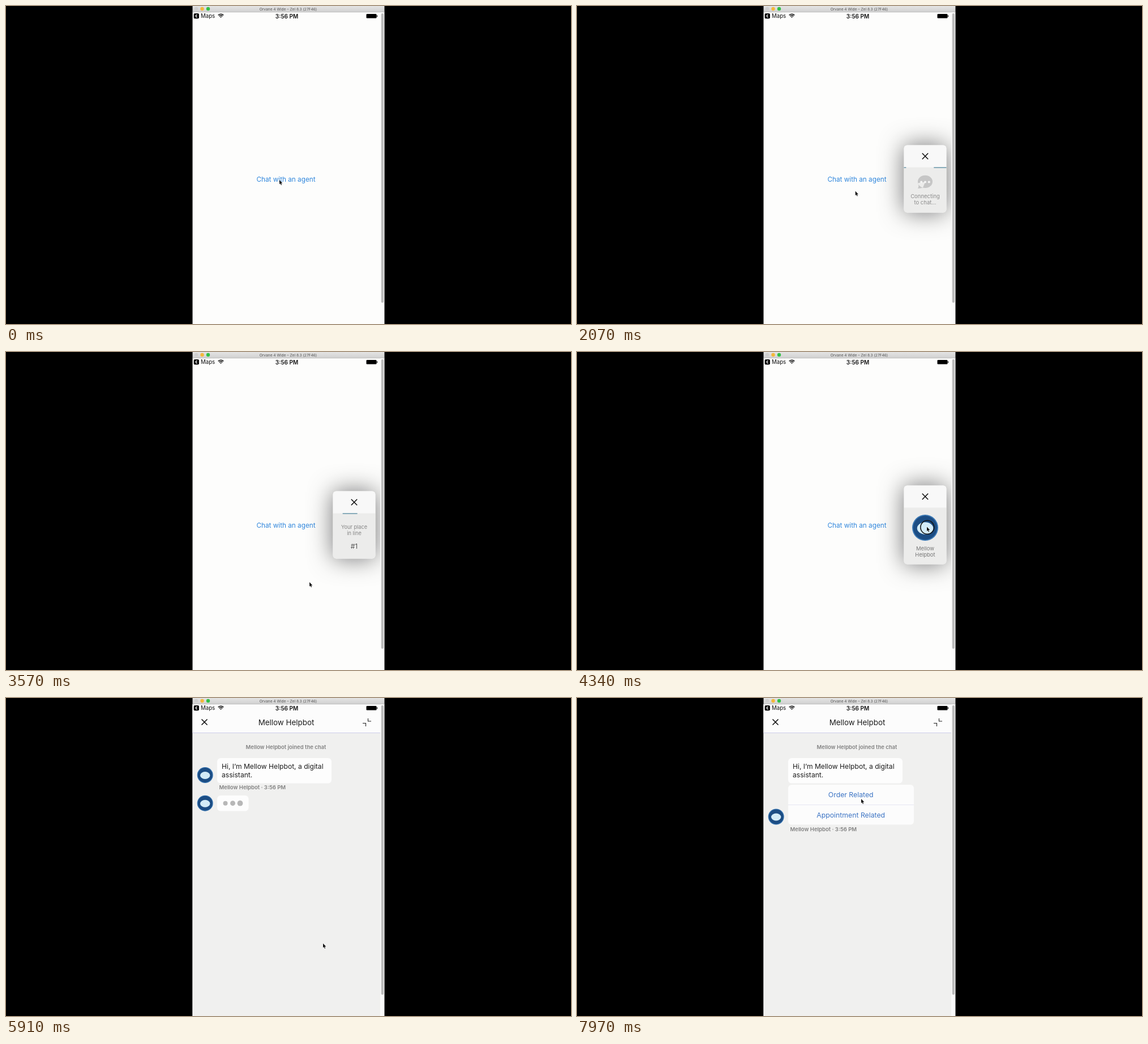
These frames come from a looping animation (998x561 px, 8000 ms). An HTML page with a canvas:

```html
<!DOCTYPE html>
<html lang="en">
<head>
<meta charset="utf-8">
<title>Chat demo</title>
<style>
  html, body { margin: 0; width: 100%; height: 100%; overflow: hidden; background: #000; }
  canvas { display: block; width: 998px; height: 561px; }
</style>
</head>
<body>
<canvas id="stage" width="998" height="561"></canvas>
<script>
const ctx = document.getElementById('stage').getContext('2d');
const LOOP = 8000;
const BOT = 'Mellow Helpbot';
const BLUE = '#2f86dc';

const clamp = v => Math.max(0, Math.min(1, v));
const lerp = (a, b, p) => a + (b - a) * p;
const ramp = (t, from, to) => clamp((t - from) / (to - from));
const smooth = p => p * p * (3 - 2 * p);
const ease = (t, from, to) => smooth(ramp(t, from, to));

// time, x, y of the pointer tip
const POINTER = [
  [0, 483, 307], [900, 482.5, 305], [1900, 482.5, 305], [2500, 529, 414.5],
  [3450, 529, 414.5], [4150, 618, 308.5], [4850, 618, 308.5], [5500, 560, 433],
  [6900, 560, 433], [7600, 502, 178], [LOOP, 502, 178]
];

function layer(alpha, draw) {
  if (alpha <= 0) return;
  ctx.save();
  ctx.globalAlpha *= alpha;
  draw();
  ctx.restore();
}

function rect(x, y, w, h, color) {
  ctx.fillStyle = color;
  ctx.fillRect(x, y, w, h);
}

function round(x, y, w, h, r, color) {
  ctx.beginPath();
  ctx.roundRect(x, y, w, h, r);
  ctx.fillStyle = color;
  ctx.fill();
}

function disc(x, y, r, color) {
  ctx.beginPath();
  ctx.arc(x, y, r, 0, 7);
  ctx.fillStyle = color;
  ctx.fill();
}

function path(points, color, width) {
  ctx.beginPath();
  points.forEach(([x, y]) => ctx.lineTo(x, y));
  ctx.strokeStyle = color;
  ctx.lineWidth = width;
  ctx.stroke();
}

// y is the middle of the capitals
function text(str, x, y, size, color = '#1c1c1c', align = 'center', weight = 400) {
  ctx.font = `${weight} ${size}px Inter, sans-serif`;
  ctx.textAlign = align;
  ctx.fillStyle = color;
  ctx.fillText(str, x, y + size * 0.36);
}

function cross(x, y, r, width = 1.6) {
  path([[x - r, y - r], [x + r, y + r]], '#111', width);
  path([[x - r, y + r], [x + r, y - r]], '#111', width);
}

function speechIcon(x, y, scale, color) {
  ctx.save();
  ctx.translate(x, y);
  ctx.scale(scale, scale);
  ctx.beginPath();
  ctx.ellipse(0, -1, 21, 18, 0, 0, 7);
  ctx.moveTo(-20, 3);
  ctx.quadraticCurveTo(-17, 13, -21, 18);
  ctx.quadraticCurveTo(-12, 19, -6, 15);
  ctx.lineTo(0, 0);
  ctx.fillStyle = color;
  ctx.fill();
  for (const dx of [-11, 0, 11]) disc(dx, 0, 3.3, '#f4f4f4');
  ctx.restore();
}

function avatar(x, y, r) {
  disc(x, y, r, '#3b78b4');
  disc(x, y, r * 0.92, '#1c4d84');
  ctx.beginPath();
  ctx.ellipse(x, y + r * 0.04, r * 0.62, r * 0.46, 0, 0, 7);
  ctx.fillStyle = '#d3ebf7';
  ctx.fill();
}

function header(title) {
  rect(329, 11, 332, 550, '#f0f0ef');
  rect(329, 11, 332, 50, '#fcfcfc');
  rect(329, 61, 332, 1, '#cdcdea');
  cross(350.5, 42.5, 5);
  text(title, 495, 43.5, 13.4);
  path([[630, 44.5], [635.5, 44.5], [635.5, 50]], '#222', 1.1);
  path([[639.5, 36], [639.5, 41], [645, 41]], '#222', 1.1);
}

function connectingScreen() {
  header('Live Chat');
  speechIcon(495, 238, 1.88, '#d2d2d2');
  text('Connecting to chat...', 495, 313, 15.2, '#777', 'center', 600);
}

function typing(t, y) {
  round(373, y - 13.7, 55.5, 27.5, 6, '#fdfdfd');
  for (let i = 0; i < 3; i++) {
    const wave = Math.sin((t - 4670) / 1240 * Math.PI * 2 + (i - 1) * 0.7);
    disc(387.5 + i * 13, y, 4.45 + 0.7 * wave, '#b7b7b7');
  }
}

function chatScreen(t) {
  const greet = ease(t, 5150, 5400);
  const wait = ease(t, 5500, 5750);
  const menu = ease(t, 6750, 7050);
  header(BOT);
  text(BOT + ' joined the chat', 494.5, 87, 9.5, '#828282', 'center', 600);

  layer(1 - greet, () => typing(t, 122.5));
  layer(greet, () => {
    round(373, 106, 202, 44.5, 6, '#fdfdfd');
    text(`Hi, I’m ${BOT}, a digital`, 381, 120.5, 12.1, '#1c1c1c', 'left');
    text('assistant.', 381, 135.5, 12.1, '#1c1c1c', 'left');
    text(BOT + ' · 3:56 PM', 376.5, lerp(157.5, 231.5, menu), 9.5, '#808080', 'left', 600);
  });
  layer(wait * (1 - menu), () => {
    typing(t, 185.7);
    avatar(351.7, 185.7, 14);
  });
  layer(menu, () => {
    round(373, 153, 222, 70.5, 6, '#fcfcfc');
    rect(373, 188, 222, 1, '#e6e6f3');
    text('Order Related', 483.7, 170.5, 12.25, '#3c74c4');
    text('Appointment Related', 483.7, 206.5, 12.25, '#3c74c4');
  });
  avatar(351.7, 122.5 + 13.5 * greet + 73.5 * menu, 14);
}

// Draws a full-size screen scaled about a new centre.
function scaled(cx, cy, scale, draw) {
  ctx.translate(cx, cy);
  ctx.scale(scale, scale);
  ctx.translate(-495.5, -286);
  draw();
}

// Only the part of the shadow outside the card is painted.
function cardShadow(x, y, w, h, strength) {
  ctx.save();
  ctx.beginPath();
  ctx.rect(329, 11, 332, 550);
  ctx.roundRect(x, y, w, h, 6);
  ctx.clip('evenodd');
  ctx.shadowColor = `rgba(0,0,0,${strength})`;
  ctx.shadowBlur = 42;
  round(x, y, w, h, 6, '#ececec');
  ctx.restore();
}

function thumbnail(t, arrival) {
  const queue = ease(t, 2880, 3200);
  const joined = ease(t, 3650, 3900);
  const width = 75 + 5 * (1 - arrival);
  const left = 652.5 - width;
  const top = 245.5 - 10 * joined;
  const height = 119 + 20 * joined;
  const mid = left + width / 2;

  cardShadow(left, top, width, height, 0.55 * arrival);

  ctx.save();
  ctx.beginPath();
  ctx.roundRect(left, top, width, height, 6);
  ctx.clip();
  rect(left, top, width, 39, '#f8f8f8');
  rect(left, top + 39, width, height - 39, '#ececeb');
  cross(mid, top + 19.5, 5.2);
  layer(1 - joined, () => {
    const laps = Math.max(0, (t - 1037) / 984);
    const tail = laps % 1 * 75 - 26;
    rect(left + tail, top + 38.8, 26, 1.5, '#6796a8');
    if (laps > 1) rect(left + tail + 75, top + 38.8, 26, 1.5, '#6796a8');
  });
  layer(1 - queue, () => {
    speechIcon(mid, 310.5, 0.62, '#c6c6c6');
    text('Connecting', mid, 336, 9.5, '#8c8c8c');
    text('to chat...', mid, 347, 9.5, '#8c8c8c');
  });
  layer(queue * (1 - joined), () => {
    text('Your place', mid, 308.5, 9.2, '#858585');
    text('in line', mid, 319.5, 9.2, '#858585');
    text('#1', mid, 342.5, 12, '#555');
  });
  layer(joined, () => {
    avatar(mid, 310, 23);
    BOT.split(' ').forEach((word, i) => text(word, mid, 346.5 + 11 * i, 9.5, '#777'));
  });
  ctx.restore();
}

function windowFrame() {
  const bar = ctx.createLinearGradient(0, 0, 0, 11);
  bar.addColorStop(0, '#e4e4e4');
  bar.addColorStop(1, '#d0d0d0');
  rect(329.5, 0, 339, 11, bar);
  rect(329.5, 10.5, 339, 0.7, '#b4b4b4');
  disc(336, 5, 3.2, '#cfcfcf');
  disc(346.5, 5, 3.2, '#f4b83c');
  disc(357, 5, 3.2, '#32c146');
  text('Orvane 4 Wide – Zel 8.3 (27F46)', 498.5, 5.3, 6.6, '#555');
  rect(661, 11, 7.5, 550, '#fafafa');
  round(662.7, 13, 4.3, 510.5, 2, '#bcbcbc');
}

function statusBar() {
  round(331.7, 13, 9.2, 9.2, 2, '#000');
  path([[337.5, 15], [335, 17.6], [337.5, 20.2]], '#fff', 1.3);
  text('Maps', 344, 18, 9.7, '#111', 'left');
  text('3:56 PM', 496, 18, 10, '#111', 'center', 600);
  for (const r of [1.2, 3.9, 6.6]) {
    ctx.beginPath();
    ctx.arc(379.5, 20.8, r, -Math.PI * 0.76, -Math.PI * 0.24);
    ctx.strokeStyle = '#111';
    ctx.lineWidth = 1.6;
    ctx.stroke();
  }
  round(636.5, 14, 18, 7.6, 1.4, '#000');
  round(655, 16.2, 1.1, 3, 0.5, '#000');
}

function pointer(t) {
  const next = Math.max(1, POINTER.findIndex(k => k[0] > t));
  const [t0, x0, y0] = POINTER[next - 1];
  const [t1, x1, y1] = POINTER[next];
  const p = ease(t, t0, t1);
  const x = lerp(x0, x1, p), y = lerp(y0, y1, p);

  if ((t > 880 && t < 1050) || (t > 4230 && t < 4400)) {
    ctx.beginPath();
    ctx.arc(x + 0.8, y + 0.8, 12, 0, 7);
    ctx.strokeStyle = '#151515';
    ctx.lineWidth = 1.6;
    ctx.stroke();
  }
  ctx.beginPath();
  [[0, 0], [0, 7.6], [1.7, 6.1], [2.9, 8.9], [4.1, 8.4], [2.9, 5.7], [5.3, 5.6]]
    .forEach(([dx, dy]) => ctx.lineTo(x + dx, y + dy));
  ctx.closePath();
  ctx.strokeStyle = '#fff';
  ctx.lineWidth = 1;
  ctx.stroke();
  ctx.fillStyle = '#111';
  ctx.fill();
}

function render(t) {
  const arrival = ramp(t, 1000, 1550);
  const expand = ease(t, 4390, 4650);
  rect(0, 0, 998, 561, '#000');

  ctx.save();
  ctx.beginPath();
  ctx.rect(329.5, 11, 331.5, 550);
  ctx.clip();
  rect(329, 11, 332, 550, '#fdfdfc');
  const pressed = ease(t, 880, 940) * (1 - ease(t, 1050, 1400));
  layer(1 - 0.6 * pressed, () => text('Chat with an agent', 494.5, 305.5, 11.75, BLUE));

  if (arrival > 0) {
    const rise = 1 - (1 - arrival) ** 1.36;
    layer(1 - arrival * arrival, () => scaled(
      lerp(495.5, 615, arrival), lerp(836, 305, rise), lerp(1, 0.226, arrival), connectingScreen));
  }
  layer(Math.sqrt(arrival) * (1 - expand), () => thumbnail(t, arrival));
  layer(Math.sqrt(expand), () => scaled(
    lerp(615, 495.5, expand), lerp(305, 286, expand), lerp(0.226, 1, expand), () => chatScreen(t)));
  ctx.restore();

  windowFrame();
  statusBar();
  pointer(t);
}

const began = performance.now();
function tick() {
  render((performance.now() - began) % LOOP);
  requestAnimationFrame(tick);
}
tick();
</script>
</body>
</html>
```
